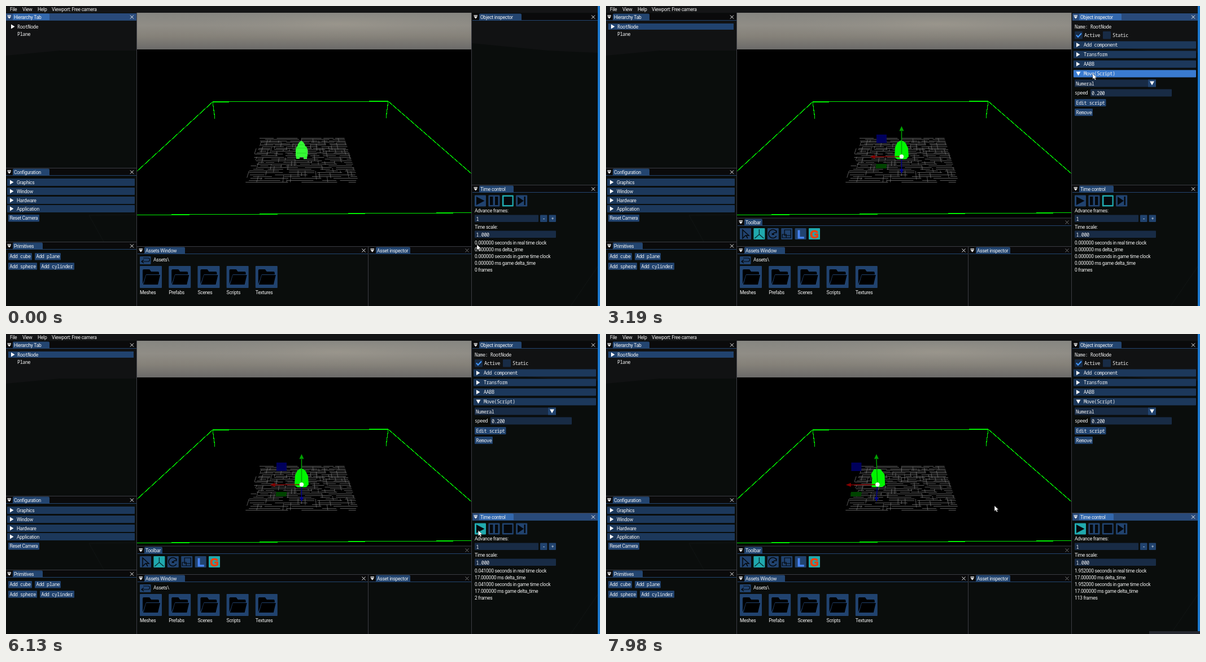
An HTML page that plays this animation: 1052x532 px, repeating every 8000 ms.

```html
<!DOCTYPE html>
<html lang="en">
<head>
<meta charset="utf-8">
<title>Scene editor</title>
<style>
html, body { margin: 0; width: 100%; height: 100%; overflow: hidden; background: #0a0d0c; }
svg { display: block; width: 1052px; height: 532px; }
text { font: 8.6px Roboto, sans-serif; letter-spacing: -.3px; fill: #f2f2f2; white-space: pre; }
text.m { font: 8.5px "Noto Sans Mono", monospace; letter-spacing: -.47px; }
</style>
</head>
<body>
<svg id="stage" viewBox="0 0 1052 532"></svg>
<script>
const BTN = '#21436f', HEAD = '#1c385b', FIELD = '#182b45', HOT = '#3a7bd0', TEAL = '#20a9ae';
const TAB = '#234570', TAB_ON = '#3368ad', BAR = '#0a0a0b', BAR_ON = '#294a7a';
const PANEL = '#0a0d0c', PANEL_TOP = '#111213', EDGE = '#3b3c43', INK = '#05080c';

const rect = (x, y, w, h, fill, extra = '') =>
  `<rect x="${x}" y="${y}" width="${w}" height="${h}" fill="${fill}" ${extra}/>`;
const path = (d, fill, extra = '') => `<path d="${d}" fill="${fill}" ${extra}/>`;
const line = (d, color, w = 1, extra = '') =>
  path(d, 'none', `stroke="${color}" stroke-width="${w}" ${extra}`);
const text = (x, mid, s, mono, extra = '') =>
  `<text x="${x}" y="${mid + 3}" class="${mono ? 'm' : ''}" ${extra}>${s}</text>`;
const group = (id, body) => `<g id="${id}">${body}</g>`;
const arrow = (x, y, open) => path(open
  ? `M${x - 4} ${y - 3}h8l-4 7z` : `M${x - 3} ${y - 4}v8l6.5 -4z`, '#fff');
const button = (x, y, w, h, s, mono = true, id = '') =>
  rect(x, y, w, h, BTN, `rx="1" id="${id}"`) + text(x + 2.5, y + h / 2, s, mono);
const cross = (x, y, dim) =>
  line(`M${x - 3} ${y - 3}l6 6m0 -6l-6 6`, dim ? '#777' : '#f2f2f2', 1);

function title(id, x, y, w, tabW, label, close, dim) {
  return rect(x, y, w, 12.5, BAR, `id="${id}Bar"`) +
    path(`M${x + 12} ${y + 12.5}v-10q0 -2 2 -2h${tabW - 4}q2 0 2 2v10z`, TAB, `id="${id}Tab"`) +
    rect(x, y + 12, w, 1, TAB) +
    rect(x + 2.5, y + 3.2, 6.5, 1.3, '#fff') + path(`M${x + 2.5} ${y + 5.5}h6.5l-3.2 4z`, '#fff') +
    text(x + 14, y + 6.7, label) + cross(close, y + 6.5, dim);
}
const header = (x, y, w, s, mono) =>
  rect(x, y, w, 13, HEAD, 'rx="1"') + arrow(x + 8, y + 6.5) +
  text(x + (mono ? 18 : 17), y + 6.5, s, mono);

function wireGrid() {
  let seed = 71, d = '';
  const rnd = () => (seed = seed * 16807 % 2147483647) / 2147483647;
  const at = (u, v) => {
    const k = v * (.82 + .18 * v);
    const l = 449 - 25 * k, r = 598 + 25 * k;
    return `${(l + (r - l) * u).toFixed(1)} ${Math.round(234 + 78 * k) + .5}`;
  };
  // broken rows, denser at the far edge, with a few short columns
  for (let i = 0; i <= 27; i++)
    for (let u = rnd() * .08; u < 1;) {
      const end = Math.min(1.01, u + .05 + rnd() * .35);
      d += `M${at(u, i / 27)}L${at(end, i / 27)}`;
      u = end + .01 + rnd() * (.04 + i * .003);
    }
  for (let i = 0; i <= 30; i++)
    for (let v = rnd() * .3; v < .95;) {
      const end = Math.min(1, v + .04 + rnd() * .14);
      d += `M${at(i / 30, v)}L${at(i / 30, end)}`;
      v = end + .15 + rnd() * (.2 + v * .5);
    }
  return line(d, '#8a8a8a', .65);
}

const scene = () => rect(232, 12, 592, 414, '#000') +
  rect(232, 12, 592, 65, 'url(#sky)') + rect(232, 12, 592, 65, 'url(#glow)') + wireGrid() +
  line('M232 293L366 170L677 169L824 297M366 170l4 29.5M677 169l-4 29.5M232 370.5L824 366.7',
    '#00f000', 1.2, 'shape-rendering="crispEdges"') +
  group('tank', path('M520 241l3 -2l3 2l3 4v2l4 4l1 4v12h-1v4h-6v-3h-7v3h-6v-4h-1v-12l1 -4l3 -4v-2z', '#35f935') +
    line('M514 252h19M515 261h17M519 246h9M515 268h4M528 268h5', '#18c818', .7)) +
  group('gizmo', path('', '#00f500', 'id="blob"') +
    path('', '#00005c', 'id="planeB"') + path('', '#004400', 'id="planeG"') +
    line('', '#840000', 1.3, 'id="axisR"') + path('', '#840000', 'id="tipR"') +
    line('', '#00008c', 1.5, 'id="axisB"') + path('', '#00008c', 'id="tipB"') +
    line('', '#00a000', 1.5, 'id="axisG"') + path('', '#00a000', 'id="tipG"') +
    '<circle id="hub" cy="267" r="3.7" fill="#fff"/>');

const left = () => rect(0, 12, 231, 520, PANEL) +
  path('M0 25H231V79L95 79L0 88z', PANEL_TOP) +
  line('M147 371l26 47M147 371l84 -1', '#131717', .8) +
  title('tree', 0, 13, 231, 65, 'Hierarchy Tab', 223) +
  rect(4, 31, 222, 11, BTN, 'id="row"') +
  arrow(12, 36.5) + text(20, 37, 'RootNode', 1) + text(20, 50, 'Plane', 1) +
  title('conf', 0, 288, 231, 65, 'Configuration', 223) +
  ['Graphics', 'Window', 'Hardware', 'Application']
    .map((s, i) => header(2, 306 + i * 16 - (i > 2), 226, s)).join('') +
  button(4, 370, 55, 12.5, 'Reset Camera', false) +
  title('prim', 0, 419, 231, 53, 'Primitives', 223) +
  button(4, 438, 42, 12.5, 'Add cube') + button(51, 438, 46, 12.5, 'Add plane') +
  button(4, 455.3, 51, 12.5, 'Add sphere') + button(60, 455.3, 61, 12.5, 'Add cylinder');

const folder = (s, i) => {
  const x = 237 + i * 51.2;
  return rect(x, 461, 39, 39, BTN, 'rx="1"') +
    path(`M${x + 5} 493v-24q0 -2 2 -2h10l3 4h12q2 0 2 2v3h-22z`, '#000') +
    path(`M${x + 6} 494l5 -17h25l-4 17z`, '#000') +
    line(`M${x + 6} 493l5 -16.5h25`, BTN, .7) + text(x, 508, s);
};
const assets = () => rect(232, 426, 592, 106, PANEL) +
  title('files', 233, 427, 408, 72, 'Assets Window', 633.5) +
  title('asset', 643, 427, 181, 61, 'Asset inspector', 816.5, true) +
  rect(237, 444, 19.5, 14, BTN, 'rx="1"') +
  line('M243 447h9q2.5 0 2.5 3t-2.5 3h-12m4 -3l-4 3l4 3', INK, 1.2) +
  text(261, 450, 'Assets\\') +
  ['Meshes', 'Prefabs', 'Scenes', 'Scripts', 'Textures'].map(folder).join('');

const toolbar = () => {
  const x = i => 237 + i * 24.4;
  const cells = [0, 1, 2, 3, 4, 5].map(i => rect(x(i), 394, 20, 20, i % 4 == 1 ? TEAL : BTN, 'rx="1"')).join('');
  const big = (i, s, c) => `<text x="${x(i) + 10}" y="411.5" text-anchor="middle" stroke="${c}"
    style="font:bold 20px 'Liberation Sans',sans-serif;fill:${c}">${s}</text>`;
  return rect(232, 376, 592, 50, PANEL) + rect(232, 375.5, 592, 1, EDGE) +
    title('tool', 233, 377, 591, 32, 'Toolbar', 816.5, true) + cells +
    line(`M${x(0) + 5} 397l11 10h-6l-5 5zM${x(0) + 11} 407l3 5`, INK, 1.5) +
    line(`M${x(1) + 10} 396v9l-8 7m8 -7l8 7`, '#06282a', 1.3) +
    line(`M${x(2) + 16} 400a7.5 7.5 0 1 0 0 8m0 -10v4h-5`, INK, 1.6) +
    rect(x(2) + 8, 403, 4, 3, INK) +
    line(`M${x(3) + 6} 397h11v10h-11zM${x(3) + 2} 405h7v6h-7zM${x(3) + 9} 411h8v-4`, INK, 1.2) +
    big(4, 'L', '#4a86f4') + big(5, 'G', '#f04010');
};

const inspector = () => text(830, 37, 'Name: RootNode', 1) +
  rect(830, 45, 14, 13.5, FIELD, 'rx="1"') + line('M833 51.5l3 3.5l6 -6.5', '#4296fa', 2) +
  text(847, 52, 'Active', 1) + rect(880, 45, 14, 13.5, FIELD, 'rx="1"') + text(897, 52, 'Static', 1) +
  ['Add component', 'Transform', 'AABB'].map((s, i) => header(828, 62.5 + i * 17, 217, s, 1)).join('') +
  rect(828, 113.5, 217, 13, HEAD, 'id="move" rx="1"') +
  group('shut', arrow(836, 120)) + group('ajar', arrow(836.5, 119.5, true)) +
  text(846, 120, 'Move(Script)', 1) +
  group('fields', rect(830, 130.5, 144, 13, FIELD, 'id="combo" rx="1"') +
    rect(960, 130.5, 14, 13, BTN) + arrow(967, 136.5, true) + text(832, 137.5, 'Numeral', 1) +
    text(830, 153.5, 'speed', 1) + rect(858, 147.5, 144, 13, FIELD, 'rx="1"') + text(860, 154.5, '0.200', 1) +
    button(830, 165, 55.5, 13, 'Edit script', true, 'edit') + button(830, 182, 32, 13, 'Remove'));

const right = () => rect(824, 12, 224, 520, PANEL) +
  path('M825 25H1048V83L960 79L825 66z', PANEL_TOP) +
  title('insp', 826, 13, 222, 75, 'Object inspector', 1040) + group('details', inspector()) +
  rect(825, 317, 223, 215, PANEL) +
  line('M1000 532l48 -70', '#131717', .8) +
  title('time', 826, 318, 222, 61, 'Time control', 1040) +
  [0, 1, 2, 3].map(i => rect(830 + i * 24.4, 335.5, 20, 20, BTN, `id="ctl${i}" rx="1"`)).join('') +
  path('M833 338v15l14.5 -7.5z', INK) +
  rect(857, 338, 5.5, 15, INK) + rect(866, 338, 5.5, 15, INK) +
  rect(881.5, 338, 15, 15, INK) +
  path('M906 338v15l11 -7.5zM917.5 338h2.5v15h-2.5z', INK) +
  text(830, 363, 'Advance frames:') + rect(830, 370.5, 113, 12.5, FIELD, 'rx="1"') + text(832.5, 377.5, '1', 1) +
  rect(946, 370.5, 12.5, 12.5, BTN, 'rx="1"') + text(950, 377, '-', 1) +
  rect(961.5, 370.5, 12.5, 12.5, BTN, 'rx="1"') + text(965.5, 377, '+', 1) +
  text(830, 391.5, 'Time scale:') + rect(830, 398.5, 144, 12.5, FIELD, 'rx="1"') + text(832.5, 405.5, '1.000', 1) +
  [0, 1, 2, 3, 4].map(i => text(830, 419.5 + i * 12.2, '', 0, `id="stat${i}"`)).join('');

const frame = () => rect(0, 0, 1048, 12, '#141516') +
  text(7, 6, 'File') + text(29, 6, 'View') + text(56, 6, 'Help') + text(81, 6, 'Viewport: Free camera') +
  line('M231.5 12V532M824.5 12V532M641.5 426V532M0 287.5H231M0 418.5H231M232 426.5H824M825 317.5H1048', EDGE) +
  rect(1048, 0, 4, 532, '#1a78cf') + rect(962, 527, 90, 5, '#25282f', 'id="toast"');

const stage = document.getElementById('stage');
stage.innerHTML = `<defs>
  <linearGradient id="sky" x2="0" y2="1"><stop stop-color="#868681"/><stop offset=".35" stop-color="#908d86"/>
  <stop offset=".65" stop-color="#858179"/><stop offset="1" stop-color="#6b6a69"/></linearGradient>
  <radialGradient id="glow" cx=".6" cy=".3" r=".5"><stop stop-color="#aca597" stop-opacity=".35"/>
  <stop offset="1" stop-color="#8a8a86" stop-opacity="0"/></radialGradient></defs>` +
  scene() + left() + assets() + group('tools', toolbar()) + right() + frame() +
  path('M0 0V9.8L2.3 7.7L4 11.2L5.7 10.4L4.1 7.1H7.2z', '#fff', 'id="cursor" stroke="#111" stroke-width=".4"');

const el = {};
stage.querySelectorAll('[id]').forEach(e => el[e.id] = e);
const show = (id, on) => el[id].style.display = on ? '' : 'none';
const set = (id, key, v) => el[id].setAttribute(key, v);
const clamp = v => Math.max(0, Math.min(1, v));
const lerp = (a, b, k) => a + (b - a) * k;

// time, x, y of the pointer
const route = [[0, 834, 423], [60, 834, 423], [280, 719, 378], [430, 762, 361], [560, 762, 360],
  [900, 420, 255], [1350, 3, 78], [1570, 11, 30], [1600, 11, 30], [1890, 40, 38], [2080, 40, 38],
  [2500, 701, 177], [2810, 846, 113], [3190, 862, 120], [3400, 862, 120], [3740, 868, 153],
  [3930, 868, 153], [4150, 872, 137], [4500, 866, 172], [4740, 866, 168], [4970, 872, 135],
  [5170, 872, 135], [5430, 880.5, 299], [5740, 839, 349], [6120, 839, 349], [6740, 688, 304.5], [8000, 688, 304.5]];
function pointer(t) {
  const i = Math.max(1, route.findIndex(p => p[0] > t));
  const [t0, x0, y0] = route[i - 1], [t1, x1, y1] = route[i], k = clamp((t - t0) / (t1 - t0));
  return [lerp(x0, x1, k), lerp(y0, y1, k)];
}

// outline of the selected tank as it turns
const front = [511, 268, 512, 251, 516, 242, 523, 238, 530, 242, 535, 252, 536, 267, 531, 272, 516, 272];
const turned = [511, 267, 511, 250, 512, 243, 517, 239, 530, 239, 533, 245, 536, 267, 532, 272, 514, 270];
const side = [513, 270, 514, 256, 512, 249, 517, 240, 529, 240, 536, 249, 537, 268, 532, 271, 516, 272];

function drawGizmo(t) {
  const s = Math.max(0, t - 7203) * .0548, x = 523.5 - s, tilt = s * .045;
  const a = clamp((t - 6200) / 800), b = clamp((t - 7080) / 700);
  const pts = front.map((v, i) => lerp(lerp(v, turned[i], a), side[i], b) - (i % 2 ? 0 : s));
  let d = '';
  for (let i = 0; i < 18; i += 2) d += (i ? 'L' : 'M') + pts[i] + ' ' + pts[i + 1];
  set('blob', 'd', d + 'z');
  set('planeB', 'd', `M${x - 44.5 - tilt} 228h18v15h-18z`);
  set('planeG', 'd', `M${x - 45 - tilt} 280h19l-1 8h-19z`);
  set('axisR', 'd', `M${x} 267L${x - 48} 267.5`);
  set('tipR', 'd', `M${x - 56} 267.5l9 -3.5v7z`);
  set('axisB', 'd', `M${x} 267L${x - tilt} 291`);
  set('tipB', 'd', `M${x - tilt - 3.5} 289.5h7l-3.5 8z`);
  set('axisG', 'd', `M${x} 267L${x - tilt} 222`);
  set('tipG', 'd', `M${x - tilt - 4} 221.5h8l-4 -8.5z`);
  set('hub', 'cx', x);
}

function update(t) {
  const picked = t >= 2040, open = t >= 3190, play = t >= 6050;
  const [x, y] = pointer(t);
  const over = (l, top, r, b) => x >= l && x <= r && y >= top && y <= b;
  set('cursor', 'transform', `translate(${x} ${y})`);
  show('cursor', t < 1430 || t >= 1570);

  const focus = play ? 'time' : t >= 3110 ? 'insp' : picked ? 'tool' : 'tree';
  for (const id of ['tree', 'tool', 'insp', 'time']) {
    set(id + 'Bar', 'fill', id == focus ? BAR_ON : BAR);
    set(id + 'Tab', 'fill', id == focus ? TAB_ON : TAB);
  }
  const onRow = t > 1600 && over(4, 31, 226, 42);
  show('row', picked || onRow);
  set('row', 'fill', onRow ? HOT : BTN);
  for (const id of ['tools', 'details', 'gizmo']) show(id, picked);
  show('tank', !picked);
  show('fields', open);
  show('ajar', open);
  show('shut', !open);
  set('move', 'fill', over(828, 113, 1045, 126) ? HOT : HEAD);
  set('combo', 'fill', over(830, 130, 974, 143.5) ? '#285087' : FIELD);
  set('edit', 'fill', over(830, 165, 885, 178) ? HOT : BTN);
  set('ctl0', 'fill', play ? TEAL : over(830, 335, 850, 356) ? HOT : BTN);
  set('ctl2', 'fill', play ? BTN : TEAL);
  show('toast', t >= 6900);

  const ms = play ? Math.max(0, Math.floor(1001.01 + (t - 7060) * 950 / 920)) : 0;
  const clock = (ms / 1000).toFixed(6), step = ms ? '17.000000' : '0.000000';
  [clock + ' seconds in real time clock', step + ' ms delta_time', clock + ' seconds in game time clock',
    step + ' ms game delta_time', Math.round(ms * .05793) + ' frames']
    .forEach((s, i) => el['stat' + i].textContent = s);
  drawGizmo(t);
}

const start = performance.now();
function tick(now) {
  update(Math.max(0, now - start) % 8000);
  requestAnimationFrame(tick);
}
update(0);
requestAnimationFrame(tick);
</script>
</body>
</html>
```
